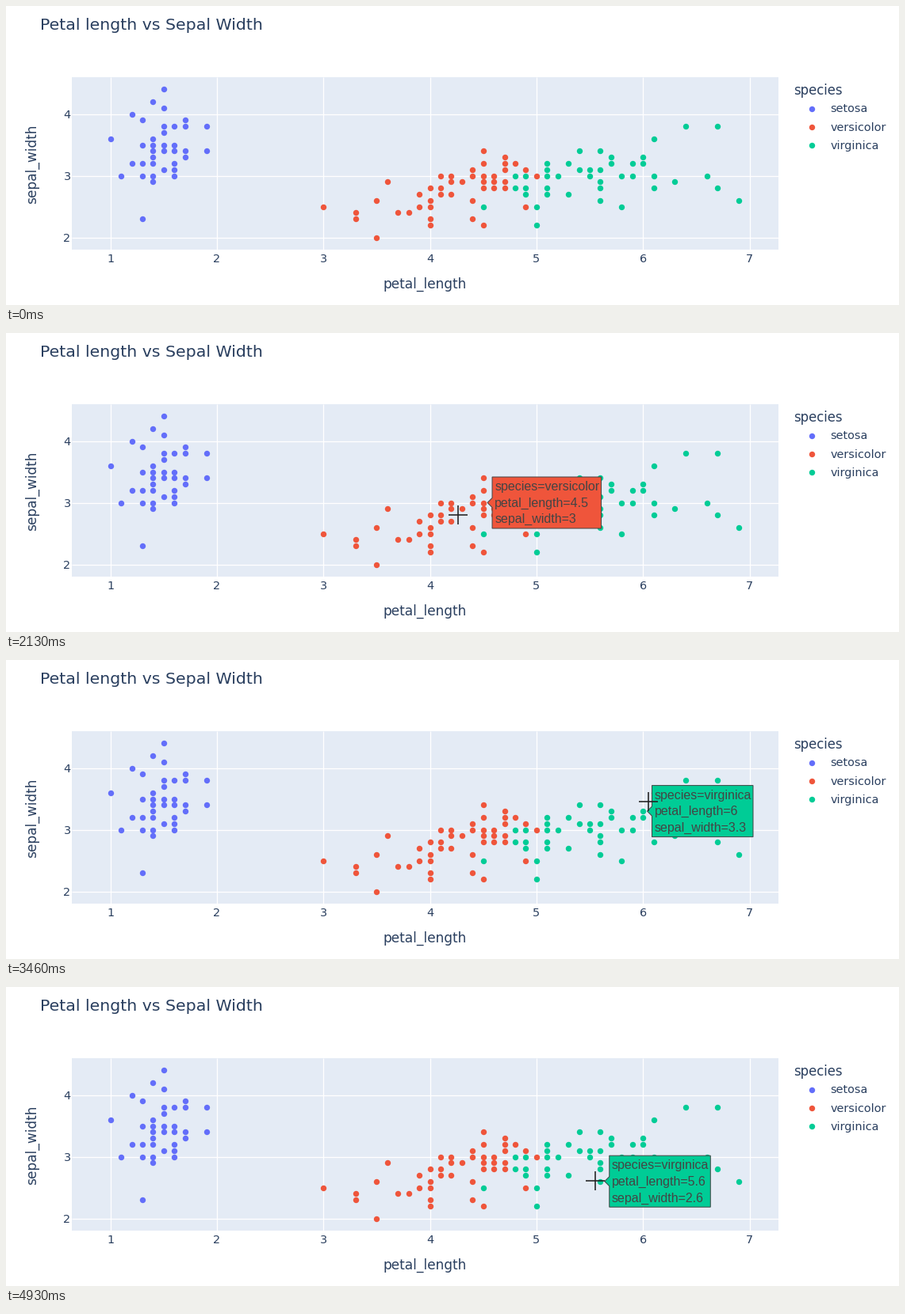
A matplotlib script for the animation above (5000 ms loop, 1126 by 378 pixels).

```python
import numpy as np
import matplotlib.pyplot as plt
from matplotlib.animation import FuncAnimation
from matplotlib.patches import Polygon, Rectangle

W, H, DPI = 1126, 378, 100
PT = 72 / DPI                 # points per pixel
LOOP, TICK = 5000, 20         # ms
STEP = LOOP / 75              # the pointer is updated 15 times a second
INK = "#2a3f5f"

# petal length -> sepal widths
SETOSA = {
    1.0: [3.6], 1.1: [3.0], 1.2: [3.2, 4.0],
    1.3: [2.3, 3.0, 3.2, 3.5, 3.9],
    1.4: [2.9, 3.0, 3.2, 3.3, 3.4, 3.5, 3.6, 4.2],
    1.5: [3.1, 3.4, 3.5, 3.7, 3.8, 4.1, 4.4],
    1.6: [3.0, 3.1, 3.2, 3.4, 3.5, 3.8],
    1.7: [3.3, 3.4, 3.8, 3.9], 1.9: [3.4, 3.8],
}
VERSICOLOR = {
    3.0: [2.5], 3.3: [2.3, 2.4], 3.5: [2.0, 2.6], 3.6: [2.9],
    3.7: [2.4], 3.8: [2.4], 3.9: [2.5, 2.7],
    4.0: [2.2, 2.3, 2.5, 2.6, 2.8], 4.1: [2.7, 2.8, 3.0],
    4.2: [2.7, 2.9, 3.0], 4.3: [2.9], 4.4: [2.3, 2.6, 3.0, 3.1],
    4.5: [2.2, 2.8, 2.9, 3.0, 3.2, 3.4], 4.6: [2.8, 2.9, 3.0],
    4.7: [2.8, 2.9, 3.1, 3.2, 3.3], 4.8: [3.2], 4.9: [2.5, 3.1],
    5.0: [3.0],
}
VIRGINICA = {
    4.5: [2.5], 4.8: [2.8, 3.0], 4.9: [2.7, 2.8, 3.0], 5.0: [2.2, 2.5],
    5.1: [2.7, 2.8, 3.0, 3.1, 3.2], 5.2: [3.0], 5.3: [2.7, 3.2],
    5.4: [3.1, 3.4], 5.5: [3.0, 3.1], 5.6: [2.6, 2.8, 2.9, 3.1, 3.4],
    5.7: [3.2, 3.3], 5.8: [2.5, 3.0], 5.9: [3.0, 3.2], 6.0: [3.2, 3.3],
    6.1: [2.8, 3.0, 3.6], 6.3: [2.9], 6.4: [3.8], 6.6: [3.0],
    6.7: [2.8, 3.8], 6.9: [2.6],
}
SPECIES = [("setosa", "#636efa", SETOSA),
           ("versicolor", "#ef553b", VERSICOLOR),
           ("virginica", "#00cc96", VIRGINICA)]

# pointer path: time, x, y in pixels
PATH = np.array([
    (930, 762, 204), (1200, 704.5, 216), (2130, 570.5, 230),
    (2330, 561, 237), (2460, 570, 233), (2730, 695, 191.5),
    (2900, 752, 187), (3000, 774, 194.5), (3300, 801, 190),
    (3600, 817, 170), (3860, 853, 157), (4000, 848.5, 169),
    (4400, 797, 208), (4700, 764, 233), (4930, 743, 245),
])
# hover labels: start time, species, petal length, sepal width
HOVERS = [
    (1260, 2, 5.2, 3.0), (1390, 2, 5.1, 3.0), (1530, 2, 4.9, 3.0),
    (1660, 2, 4.8, 3.0), (1800, 1, 4.7, 2.9), (1930, 1, 4.6, 3.0),
    (2060, 1, 4.5, 3.0), (2200, 1, 4.3, 2.9), (2330, 1, 4.2, 2.7),
    (2790, 2, 5.3, 3.2), (2920, 2, 5.6, 3.4), (3190, 2, 5.7, 3.3),
    (3320, 2, 6.0, 3.3), (3590, 2, 6.1, 3.6), (3850, 2, 6.4, 3.8),
    (4190, 2, 6.1, 3.6), (4320, 2, 6.0, 3.2), (4450, 2, 5.9, 3.0),
    (4590, 2, 5.8, 3.0), (4720, 2, 5.6, 2.8), (4860, 2, 5.6, 2.6),
]


def px(v):
    return 131.7 + 134.3 * (v - 1)


def py(v):
    return 214.5 - 78 * (v - 3)


fig = plt.figure(figsize=(W / DPI, H / DPI), dpi=DPI, facecolor="white")
ax = fig.add_axes([0, 0, 1, 1])
ax.set_xlim(0, W)
ax.set_ylim(H, 0)
ax.axis("off")


def label(x, y, s, size, color=INK, font="DejaVu Sans", **kw):
    kw.setdefault("va", "baseline")
    return ax.text(x, y, s, fontsize=size * PT, color=color, family=font, **kw)


def line(xs, ys, width, color, z):
    return ax.plot(xs, ys, color=color, lw=width * PT, zorder=z,
                   solid_capstyle="butt")[0]


def dots(xs, ys, color):
    ax.scatter(xs, ys, s=(7.4 * PT) ** 2, color=color, linewidths=0, zorder=3)


# plot area, grid and ticks
ax.add_patch(Rectangle((82.5, 90), 891, 218, fc="#e4ebf5", ec="none", zorder=1))
for v in range(1, 8):
    line([px(v)] * 2, [90, 308], 1.3, "white", 2)
    label(px(v), 324, str(v), 14.4, ha="center")
for v in (2, 3, 4):
    line([82.5, 973.5], [py(v)] * 2, 1.3, "white", 2)
    label(81.5, py(v) + 5.2, str(v), 14.4, ha="right")

label(43, 30, "Petal length vs Sepal Width", 20.5)
label(528, 357, "petal_length", 17, ha="center")
label(42.5, 199.5, "sepal_width", 17, rotation=90, ha="right", va="center")
label(993.5, 112, "species", 16.5)

for i, (name, color, data) in enumerate(SPECIES):
    pts = np.array([(px(a), py(b)) for a, bs in data.items() for b in bs])
    dots(pts[:, 0], pts[:, 1], color)
    y = 129.5 + 23 * i
    dots([1015.5], [y], color)
    label(1039.5, y + 5, name, 14.4)

# hover label and pointer
tip = Polygon([(0, 0)] * 3, closed=True, ec="#444444", lw=PT, zorder=6)
ax.add_patch(tip)
rows = [label(0, 0, "", 16, "#444444", "Liberation Sans", zorder=7)
        for _ in range(3)]
cross_h = line([], [], 1.6, "#222222", 8)
cross_v = line([], [], 1.6, "#222222", 8)
moving = [tip, *rows, cross_h, cross_v]


def show_hover(kind, length, width):
    name, color, _ = SPECIES[kind]
    x, y = px(length), py(width)
    left, half = x + 11.3, 32.5
    right = left + (137.5 if name == "versicolor" else 127.5)
    tip.set_xy([(x + 5.3, y), (left, y - 6), (left, y - half),
                (right, y - half), (right, y + half), (left, y + half),
                (left, y + 6)])
    tip.set_facecolor(color)
    texts = (f"species={name}", f"petal_length={length:g}",
             f"sepal_width={width:g}")
    for k, (row, s) in enumerate(zip(rows, texts)):
        row.set_text(s)
        row.set_position((left + 3.2, y - 15.5 + 20.6 * k))


def draw(i):
    t = int((i * TICK + 17) / STEP) * STEP
    pointing = t >= PATH[0, 0]
    hover = [h for h in HOVERS if h[0] <= t]
    for a in (cross_h, cross_v):
        a.set_visible(pointing)
    for a in (tip, *rows):
        a.set_visible(bool(hover))
    if pointing:
        x, y = (np.interp(t, PATH[:, 0], PATH[:, c]) for c in (1, 2))
        cross_h.set_data([x - 12, x + 12], [y, y])
        cross_v.set_data([x, x], [y - 12, y + 12])
    if hover:
        show_hover(*hover[-1][1:])
    return moving


anim = FuncAnimation(fig, draw, frames=LOOP // TICK, interval=TICK,
                     repeat=True, repeat_delay=0, blit=False)
plt.show()
```
